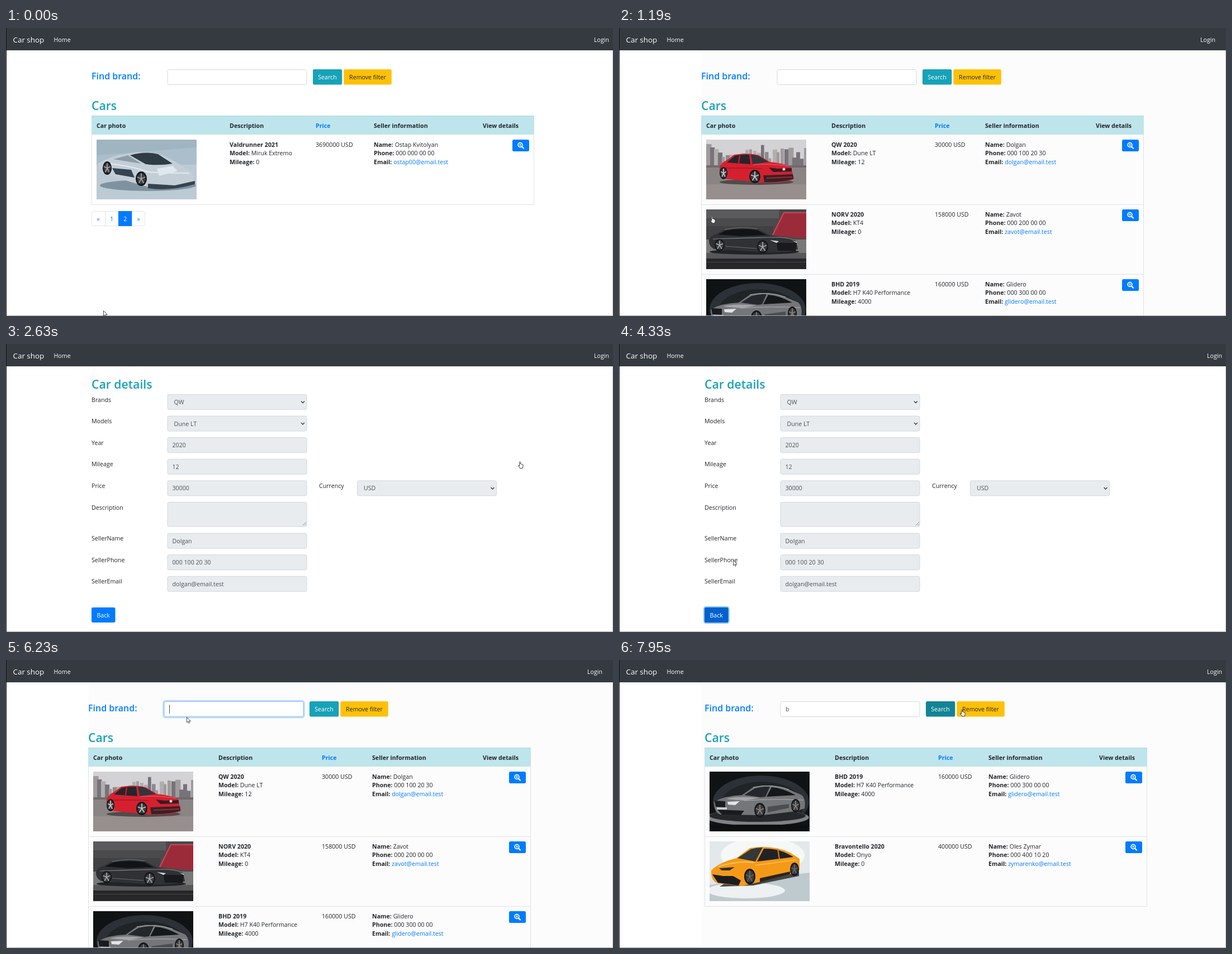
These frames come from a looping animation (1086x516 px, 8 s). An HTML page:

```html
<!DOCTYPE html>
<html lang="en">
<head>
<meta charset="utf-8">
<title>Car shop</title>
<style>
  html, body { margin: 0; width: 100%; height: 100%; overflow: hidden; background: #fff; }
  svg { display: block; }
  text { font: 10.65px "Open Sans", "Noto Sans", sans-serif; fill: #212529; white-space: pre; }
  .b { font-weight: 700; }
  .h { font-weight: 600; font-size: 21.2px; fill: #17a2b8; }
  .find { font-weight: 600; font-size: 16px; fill: #007bff; }
  .brand { font-size: 13.4px; }
  .link { fill: #007bff; }
  .w { fill: #fff; }
  .v { fill: #495057; }
  .m { text-anchor: middle; }
</style>
</head>
<body>
<svg id="stage" width="1086" height="516" viewBox="0 0 1086 516"></svg>
<script>
const LOOP = 8000;
const BLUE = '#007bff', TEAL = '#17a2b8', TEAL_DARK = '#138496', LINE = '#dee2e6', FIELD = '#ced4da';

// Anything carrying data-show is visible only inside its from/to pairs of milliseconds.
const during = (spans, body) => `<g data-show="${spans}">${body}</g>`;
const text = (x, y, s, cls = '') => `<text x="${x}" y="${y}" class="${cls}">${s}</text>`;
const rect = (x, y, w, h, fill, more = '') =>
  `<rect x="${x}" y="${y}" width="${w}" height="${h}" fill="${fill}" ${more}/>`;
const path = (d, fill, more = '') => `<path d="${d}" fill="${fill}" ${more}/>`;
const line = (d, color, width = 1) => path(d, 'none', `stroke="${color}" stroke-width="${width}"`);
const ellipse = (x, y, rx, ry, fill) => `<ellipse cx="${x}" cy="${y}" rx="${rx}" ry="${ry}" fill="${fill}"/>`;
const box = (x, y, w, h, fill, stroke = FIELD) =>
  rect(x + .5, y + .5, w - 1, h - 1, fill, `rx="2.8" stroke="${stroke}" stroke-width=".9"`);
const ring = (x, y, w, h, color) =>
  rect(x - 1.1, y - 1.1, w + 2.2, h + 2.2, 'none', `rx="4" stroke="${color}" stroke-width="2.3"`);
const button = (x, y, w, h, fill) => rect(x, y, w, h, fill, 'rx="2.8"');

// Car pictures, 179 x 107
function wheel(x, y, rx, ry, rim = '#a3a4a8') {
  let spokes = '';
  for (let a = -Math.PI / 2; a < 4.7; a += Math.PI * .4)
    spokes += `M${x} ${y}L${x + rx * .75 * Math.cos(a)} ${y + ry * .75 * Math.sin(a)}`;
  return ellipse(x, y, rx, ry, '#17181a') + ellipse(x, y, rx * .75, ry * .75, '#3b3c40') + line(spokes, rim, 1.8);
}

function skyline() {
  let out = '', seed = 7;
  const rnd = () => (seed = seed * 16807 % 2147483647) / 2147483647;
  for (let x = 0; x < 179; x += 7) {
    const top = 8 + rnd() * 28;
    out += rect(x, top, 4 + rnd() * 6, 48 - top, ['#8d898d', '#a09b9c', '#77737a', '#b3aead'][rnd() * 4 | 0]);
  }
  return out;
}

const photos = {
  silver: rect(0, 0, 179, 107, '#9fb5c2') + rect(0, 45, 179, 62, '#bccad3') +
    path('M0 28L179 14V45H0Z', '#aabfcb') + ellipse(92, 82, 86, 10, '#7e929f') +
    path('M2 43Q25 29 56 25Q88 18 116 27Q150 42 171 60L176 78Q130 92 97 86L58 75L9 60Z', '#c3ced7') +
    path('M60 28Q86 20 110 26L136 43Q112 47 88 44Z', '#2f3b45') +
    path('M30 35L56 28L80 43L60 40Z', '#8d9ea9') + line('M20 43Q60 46 92 58Q130 60 166 60', '#e4ebef', 2) +
    path('M28 51L62 54L68 68L34 62ZM92 79L140 82L176 74V80Q130 93 92 87Z', '#354350') +
    path('M108 52L136 47L145 56L112 65Z', '#e1e8ec') + wheel(19, 51, 8, 12) + wheel(80, 70, 10, 13),
  red: rect(0, 0, 179, 107, '#d3d3d6') + skyline() + rect(0, 46, 179, 61, '#8b8485') +
    rect(0, 46, 179, 4, '#6f6a6b') + rect(0, 80, 179, 27, '#978f8e') + ellipse(90, 76, 66, 5, '#514a4b') +
    path('M24 50Q27 41 38 36L50 27Q76 23 94 28L114 40Q142 43 152 50L157 70Q146 78 100 77L32 70Q23 64 24 50Z', '#d5202f') +
    path('M37 41L51 29Q64 26 77 27L79 44Z', '#25262b') + path('M80 27Q89 27 95 30L112 40L83 44Z', '#34343c') +
    line('M60 28L58 42', '#c01b29', 2.5) + line('M28 51Q66 50 100 52', '#a81623', 1.5) +
    line('M84 45Q116 42 148 48', '#ee4a55', 1.5) +
    path('M112 50L128 52L153 51V57L120 58Z', '#3a1a21') + path('M102 64L155 62L156 70Q136 77 104 76Z', '#2f2527') +
    line('M108 69L154 67', '#b4202c', 2) + ellipse(139, 53, 2.5, 2.5, '#d9d9dc') +
    wheel(31, 60, 7, 11, '#c5c5c8') + wheel(87, 66, 10, 12, '#c5c5c8'),
  black: rect(0, 0, 179, 107, '#4b4a4c') + rect(0, 0, 130, 16, '#5b5a5c') + rect(0, 30, 120, 24, '#414143') +
    path('M138 5H179V52L118 46Z', '#9c2b39') + line('M179 6H139L119 46', '#cd4757', 2) +
    rect(0, 54, 179, 24, '#787879') + rect(0, 78, 179, 10, '#58585a') + rect(0, 88, 179, 19, '#27272a') +
    rect(0, 94, 179, 1, '#4a4a4c') + ellipse(86, 76, 80, 5, '#222326') +
    path('M5 54Q9 46 20 43L33 36Q64 30 92 35L116 47Q150 49 161 57L164 71Q150 78 104 77L14 71Q4 66 5 54Z', '#303135') +
    path('M21 45L35 38Q62 33 91 37L108 46L62 48Z', '#121316') + line('M33 36Q64 30 92 35', '#77787c') +
    line('M12 53Q62 51 116 50Q142 49 158 55', '#85868b', 1.2) + line('M34 66L90 70', '#6b6c70') +
    path('M126 60H162L160 74H128Z', '#191a1d') + path('M114 55L130 57L126 60ZM154 56L162 58V60Z', '#dcdde0') +
    wheel(24, 64, 9, 11) + wheel(101, 67, 10, 12),
  grey: rect(0, 0, 179, 107, '#101314') + ellipse(92, 54, 86, 47, '#2b3136') + ellipse(94, 60, 74, 42, '#1f2427') +
    ellipse(86, 82, 92, 15, '#7d8286') + ellipse(86, 79, 86, 11, '#25282b') + rect(0, 95, 179, 12, '#0c0e0f') +
    path('M8 54Q28 43 58 42L78 28Q112 21 142 32L165 42Q173 50 170 66L154 71L96 78L20 77Q8 74 8 54Z', '#747679') +
    path('M62 42L81 30Q98 26 108 27L100 45L92 46Z', '#24282c') + path('M102 45L111 28Q130 29 154 42Z', '#15181a') +
    line('M78 28Q112 21 142 32', '#b2b5b8') + path('M30 49Q46 43 90 47L62 52Z', '#a4a6a9') +
    path('M9 52L28 53V64L11 63ZM14 68L62 70L56 78L22 77Z', '#191b1d') + path('M32 54L54 53L46 60L33 59Z', '#e1e5e8') +
    line('M62 52Q120 48 168 51', '#b0b3b6') + path('M104 63L142 58L142 65L104 73Z', '#4b4d50') + rect(13, 64, 18, 4, '#c8cdd2') +
    wheel(90, 69, 10, 13, '#8a8175') + wheel(154, 61, 8, 12, '#8a8175'),
  orange: rect(0, 0, 179, 107, '#e3e8ea') + ellipse(95, 25, 75, 32, '#f6f8f8') + path('M0 78Q90 65 179 56V107H0Z', '#bfcace') +
    ellipse(65, 88, 70, 14, '#eef1f1') + path('M18 81L78 79L160 62V54H60Z', '#434645') +
    path('M3 52Q18 37 48 30L72 12Q110 5 144 20L161 31V51L144 59L88 73L58 80L14 75Q2 70 3 52Z', '#f49a18') +
    path('M50 30L74 14Q84 11 95 11L82 36Z', '#33383c') + path('M85 36L97 13Q126 12 150 28Z', '#202326') +
    line('M122 13l3 19', '#d5800c', 2) + line('M16 45Q50 34 80 38', '#ffc25c', 2) +
    path('M5 59L24 62L42 62L56 70L52 79L15 74Z', '#1c1d1f') + path('M17 48L45 46L36 52L22 52Z', '#34312d') +
    line('M82 43L154 33', '#ffb845', 2) + path('M90 66L144 54V59L90 73Z', '#2a241d') +
    wheel(72, 63, 10, 14, '#6b655e') + wheel(152, 50, 8, 12, '#6b655e')
};

const cars = {
  silver: ['Valdrunner 2021', 'Miruk Extremo', 0, 3690000, 'Ostap Kvitolyan', '000 000 00 00', 'ostap00'],
  red: ['QW 2020', 'Dune LT', 12, 30000, 'Dolgan', '000 100 20 30', 'dolgan'],
  black: ['NORV 2020', 'KT4', 0, 158000, 'Zavot', '000 200 00 00', 'zavot'],
  grey: ['BHD 2019', 'H7 K40 Performance', 4000, 160000, 'Glidero', '000 300 00 00', 'glidero'],
  orange: ['Bravontello 2020', 'Onyo', 0, 400000, 'Oles Zymar', '000 400 10 20', 'zymarenko']
};
const MAIL = '@email.test';

const pair = (x, y, label, value, cls = '') =>
  `<text x="${x}" y="${y}"><tspan class="b">${label}:</tspan> <tspan class="${cls}">${value}</tspan></text>`;

const zoomIcon = (x, y) => `<g transform="translate(${x} ${y})" fill="none" stroke="#fff">
  <circle cx="-1" cy="-1" r="3.9" stroke-width="1.7"/><path d="M2 2L5 5" stroke-width="2.2" stroke-linecap="round"/>
  <path d="M-3 -1H1M-1 -3V1" stroke-width="1.2"/></g>`;

function carRow(key, left, y, [desc, price, seller]) {
  const [title, model, mileage, cost, name, phone, mail] = cars[key];
  return `<svg x="${left + 9}" y="${y + 9}" width="179" height="107">${photos[key]}</svg>` +
    text(desc, y + 21.5, title, 'b') + pair(desc, y + 37, 'Model', model) + pair(desc, y + 52.5, 'Mileage', mileage) +
    text(price, y + 21.5, cost + ' USD') +
    pair(seller, y + 21.5, 'Name', name) + pair(seller, y + 37, 'Phone', phone) +
    pair(seller, y + 52.5, 'Email', mail + MAIL, 'link') +
    button(left + 753, y + 9, 30, 21, BLUE) + zoomIcon(left + 768, y + 19.5) +
    rect(left, y + 125, 792, 1, LINE);
}

function listPage(left, cols, keys, { query = '', searchFill = TEAL, states = '' } = {}) {
  const bottom = 125 * keys.length;
  return text(left, 91.5, 'Find brand:', 'find') + box(left + 135.5, 74, 250, 28, '#fff') +
    text(left + 145, 92.2, query, 'v') + button(left + 396, 74, 52.3, 27.5, searchFill) +
    button(left + 451.3, 74, 85.5, 27.5, '#ffc107') + states +
    text(left + 422, 92.2, 'Search', 'w m') + text(left + 494, 92.2, 'Remove filter', 'm') +
    text(left, 147, 'Cars', 'h') + rect(left, 157, 792, 34, '#bee5eb') + rect(left, 157, 792, 1, '#a9d9e0') +
    ['Car photo', 'Description', 'Price', 'Seller information', 'View details']
      .map((s, i) => text([left + 9, ...cols][i], 179, s, i == 2 ? 'b link' : 'b')).join('') +
    rect(left, 191, 1, bottom, LINE) + rect(left + 791, 191, 1, bottom, LINE) +
    keys.map((key, i) => carRow(key, left, 191 + 125 * i, cols)).join('');
}

const pager = box(153, 328, 96, 27, '#fff', LINE) +
  during('540 1190', rect(153.5, 328.5, 24, 26, '#e9ecef')) +
  rect(177, 328, 1, 27, LINE) + rect(201, 328, 24.3, 27, BLUE) +
  during('940 1190', ring(153, 328, 24, 27, 'rgba(0,123,255,.25)')) +
  ['«', '1', '2', '»'].map((s, i) => text(165.2 + 24 * i, 346, s, i == 2 ? 'w m' : 'link m')).join('');

const listStates =
  during('5120 7040', box(282.5, 74, 250, 28, '#fff', '#80bdff') + ring(282.5, 74, 250, 28, 'rgba(0,123,255,.25)')) +
  during('5240 5720 6230 6380', rect(292, 80, 1, 16, '#495057')) +
  during('6380 7280', text(292, 92.2, 'b', 'v')) +
  during('6380 6890', rect(298.5, 80, 1, 16, '#495057')) +
  during('6770 7280', button(543, 74, 52.3, 27.5, TEAL_DARK)) +
  during('7040 7280', ring(543, 74, 52.3, 27.5, 'rgba(58,176,195,.5)'));

const viewHover = during('2140 2630', button(900, 200, 30, 21, '#0069d9') + zoomIcon(915, 210.5)) +
  during('2510 2630', ring(900, 200, 30, 21, 'rgba(38,143,255,.5)'));

function detailsPage() {
  const chevron = (x, y) => line(`M${x - 3} ${y - 1.5}l3 3 3 -3`, '#343a40', 1.4);
  const field = (x, y, value, select) => box(x, y, 250, 28, '#e9ecef') +
    text(x + (select ? 12 : 9), y + 18, value, 'v') + (select ? chevron(x + 242.5, y + 14) : '');
  const [title, model, mileage, cost, name, phone, mail] = cars.red;
  const [brand, year] = title.split(' ');
  const rows = [['Brands', brand], ['Models', model], ['Year', year], ['Mileage', mileage], ['Price', cost],
    ['Description', ''], ['SellerName', name], ['SellerPhone', phone], ['SellerEmail', mail + MAIL]];
  return text(153, 79.5, 'Car details', 'h') + rows.map(([label, value], i) => {
    const y = 90 + 38.6 * i + (i > 5 ? 17 : 0);
    return text(153, y + 13.5, label) + (i == 5
      ? box(288.5, y, 250, 44.5, '#e9ecef') + line(`M531 ${y + 42}l6 -6M534.5 ${y + 42}l2.5 -2.5`, '#777', .8)
      : field(288.5, y, value, i < 2));
  }).join('') + text(560, 258, 'Currency') + field(628, 244.4, 'USD', true) +
    button(153, 472, 42.5, 27, BLUE) + during('3450 4450', button(153, 472, 42.5, 27, '#0062cc')) +
    during('3720 4450', ring(153, 472, 42.5, 27, 'rgba(38,143,255,.5)')) + text(174.2, 490, 'Back', 'w m');
}

const FIRST = '1190 2630 4450 7280';
const pointerShapes = {
  arrow: path('M.5 .5V10L2.6 8 4.2 11.3 5.6 10.6 4.1 7.5H7.2Z', '#fff', 'stroke="#222" stroke-width=".8"'),
  hand: path('M2.6 8.6V1.6Q3.5 -.2 4.5 1.6V5Q5.7 4.2 6.2 5.4Q7.4 4.7 7.7 6Q9 5.6 9 7V9.5Q8.8 11 8 12.8H3.6Q2.8 11 .6 8.4Q.4 6.6 2.6 8.6Z',
    '#fff', 'stroke="#222" stroke-width=".9"'),
  beam: line('M0 .5H5M0 11.5H5M2.5 .5V11.5', '#222')
};

const stage = document.getElementById('stage');
stage.innerHTML = rect(0, 0, 1086, 516, '#fff') + rect(0, 0, 1086, 40, '#343a40') +
  during('1190 2630 4450 8000', rect(148, 40, 938, 476, '#fcfcfc')) +
  text(12.5, 25.8, 'Car shop', 'w brand') + text(85.5, 24.7, 'Home', 'w') +
  during(FIRST, text(1040, 24.7, 'Login', 'w')) +
  during('0 1190 2630 4450 7280 8000', text(1052, 24.7, 'Login', 'w')) +
  during('0 1190', listPage(153, [400, 554, 658, 853], ['silver']) + pager) +
  during(FIRST, listPage(147, [380, 565, 655, 853], ['red', 'black', 'grey'], { states: listStates }) + viewHover) +
  during('2630 4450', detailsPage()) +
  during('7280 8000', listPage(153, [386, 571, 661, 859], ['grey', 'orange'], { query: 'b', searchFill: TEAL_DARK })) +
  rect(0, 0, 1, 516, '#111') + rect(1, 515, 1085, 1, '#a8a8a8') + rect(1085, 40, 1, 476, '#c4c4c4') +
  '<g id="pointer">' + Object.entries(pointerShapes).map(([k, s]) => `<g data-kind="${k}">${s}</g>`).join('') + '</g>';

// Pointer stops: time x y, grouped by shape; the pointer jumps between them.
const stops = [
  ['arrow', '0 174 506, 150 172 500, 300 172 455, 420 168 385'],
  ['hand', '540 163 337'],
  ['arrow', '1340 218 307, 1480 249 275, 1620 400 228, 1740 560 195, 1890 760 200, 2010 972 206'],
  ['hand', '2140 920 209, 2270 916 210'],
  ['arrow', '2910 850 245, 3030 777 272, 3180 177 442'],
  ['hand', '3330 178 466, 3450 172 488, 3570 169 484'],
  ['arrow', '4210 190 440, 4330 204 387, 4450 262 249, 4570 292 192, 4710 318 136'],
  ['beam', '4850 328 92, 4970 333 86'],
  ['arrow', '5360 322 105, 5480 323 102, 6500 421 102'],
  ['beam', '6650 500 94'],
  ['hand', '6770 552 94, 6890 557 92'],
  ['arrow', '7530 558 92'],
  ['hand', '7670 557 91, 7950 610 88']
].flatMap(([kind, list]) => list.split(', ').map(s => [kind, ...s.split(' ').map(Number)]));

const timed = [...stage.querySelectorAll('[data-show]')].map(el => [el, el.dataset.show.split(' ').map(Number)]);
const pointer = document.getElementById('pointer');
const show = (el, on) => el.style.display = on ? '' : 'none';

function render(t) {
  for (const [el, spans] of timed) show(el, spans.filter(edge => edge <= t).length % 2);
  const [kind, , x, y] = stops.findLast(stop => stop[1] <= t);
  pointer.setAttribute('transform', `translate(${x} ${y})`);
  for (const shape of pointer.children) show(shape, shape.dataset.kind == kind);
}

const start = performance.now();
function tick() {
  render((performance.now() - start) % LOOP);
  requestAnimationFrame(tick);
}
tick();
</script>
</body>
</html>
```
